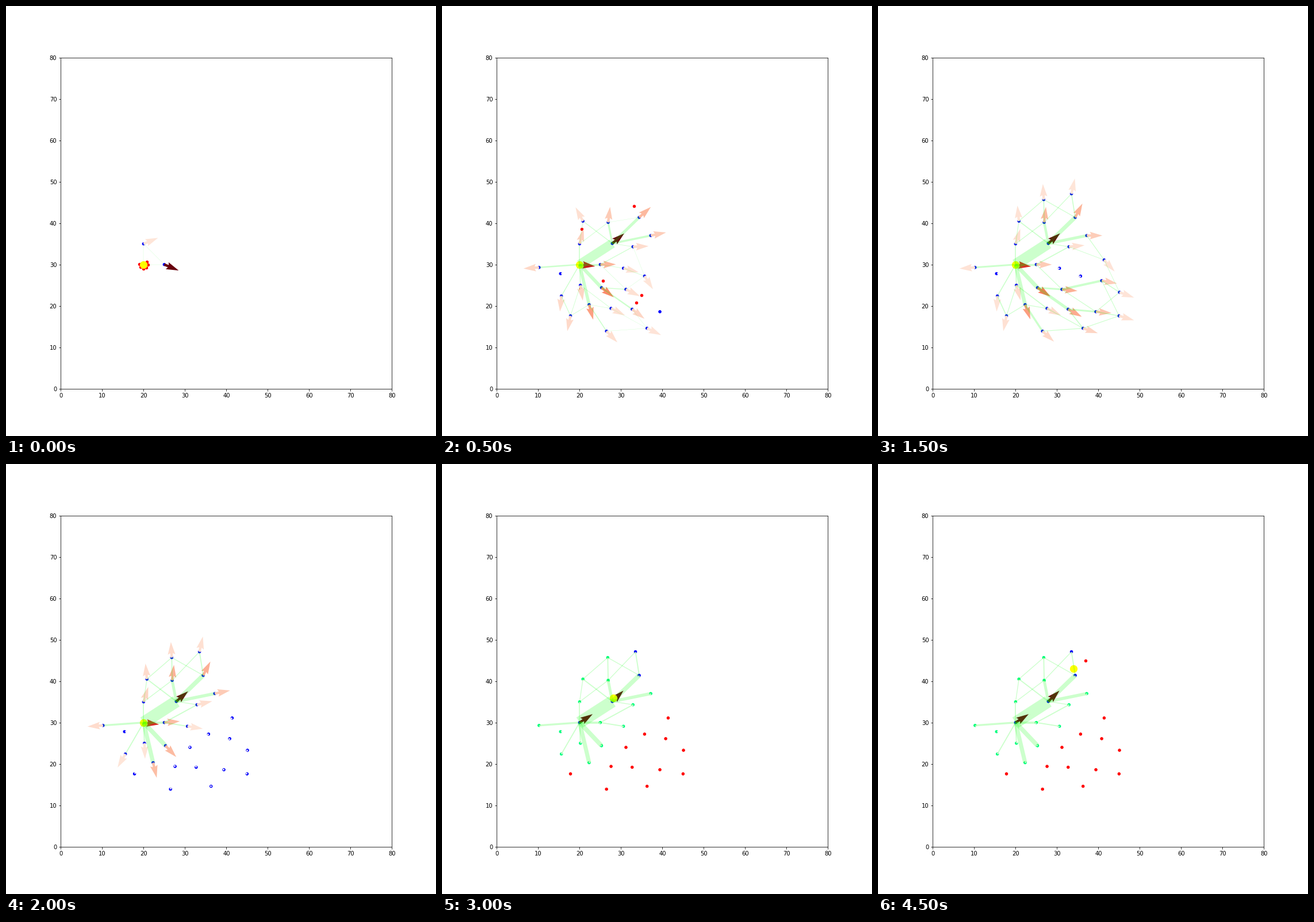
A matplotlib script that plays this animation: 748 by 748 pixels, repeating every 5000 ms.

```python
import numpy as np
import matplotlib.pyplot as plt
from matplotlib.animation import FuncAnimation
from matplotlib.collections import LineCollection

STEPS = 50
WITHER, PRUNE, MARK, FORAGE = 13, 20, 25, 38  # steps where the colony changes

# x, y, parent; listed in order of birth
CELLS = [
    (20, 30, None), (20, 35, 0), (25, 30, 0), (20.2, 25, 0), (25.3, 24.4, 0),
    (27.9, 35.1, 0), (15.6, 22.4, 0), (15.4, 27.8, None), (10.2, 29.3, 0),
    (22.3, 20.3, 0), (17.8, 17.6, 6), (20.8, 40.5, 5), (26.9, 40.2, 5),
    (34.4, 41.4, 5), (37.2, 37, 5), (32.9, 34.3, 2), (30.6, 29.1, 2),
    (35.7, 27.2, 16), (31.2, 24, 4), (27.6, 19.4, 3), (32.7, 19.2, 4),
    (26.5, 13.9, 9), (36.3, 14.6, 20), (39.4, 18.6, 20), (26.8, 45.7, 12),
    (33.5, 47.1, 13), (40.8, 26.1, 18), (45, 17.6, 23), (45.1, 23.3, 26),
    (41.4, 31.1, 14)]
POS = np.array([c[:2] for c in CELLS])
BIRTH = np.floor(np.interp(range(len(CELLS)), [2, 3, 22, 23, 24, 26, 27, 29],
                           [-1, 1, 4, 5, 7, 7, 9, 12]))
REACH = np.hypot(*(POS - POS[0]).T)
DEAD = (REACH > 12) & (POS[:, 1] < 32)  # far from the trail to the food
TRAIL = [0, 5, 13, 25]
WITHERED = (16, 17)

# widths of the main veins; other branches stay thin
VEINS = {5: 19, 13: 7, 4: 7, 9: 6.5, 20: 5, 14: 5, 12: 4.5, 26: 4, 2: 3.5,
         21: 3.5, 18: 3, 23: 3, 8: 3}
TREE = [(c[2], n, VEINS.get(n, 1.7))
        for n, c in enumerate(CELLS) if c[2] is not None]
CROSS = [(i, j, 1.2) for i, j in [
    (1, 11), (1, 12), (9, 10), (3, 10), (9, 19), (21, 22), (19, 22), (2, 18),
    (22, 27), (23, 28), (26, 27), (15, 29), (29, 28), (11, 24), (13, 24),
    (12, 25), (5, 15), (18, 23)]]
BRIEF = [(1, 2), (15, 17), (17, 18), (17, 26), (12, 13), (24, 25)]

# where each scout has got to at steps 5, 8 and 13
SCOUTS = [
    [(33.1, 44.2)], [(35, 22.6), (39, 27.9), (44.5, 23)],
    [(33.7, 20.8), (43, 20), (45, 18)], [(20.2, 24.3)], [(20.5, 38.6)],
    [(25.7, 26.1), (29, 22.8), (33, 24)]]
FOOD = [(25, 20, 30), (30, 28.1, 36), (36, 34.2, 42.5), (37, 34.2, 42.5),
        (38, 34, 43)]


def polar(deg):
    return np.array([np.cos(np.radians(deg)), np.sin(np.radians(deg))])


def along(times, points, step):
    x, y = np.transpose(points)
    return np.array([np.interp(step, times, x), np.interp(step, times, y)])


def food(step):
    t, *xy = np.transpose(FOOD)
    return along(t, np.transpose(xy), step)


def scouts(step):
    if step >= FORAGE:
        r = 3.5 * min(1, (step - FORAGE + 1) / 8)
        count = 3 if step < FORAGE + 6 else 1
        return [food(step) + r * polar(35 + 120 * k) for k in range(count)]
    found = []
    for k, stops in enumerate(SCOUTS):
        times = [0, 5, 8, 13][:len(stops) + 1]
        if step <= times[-1]:
            start = POS[0] + polar(40 - 45 * k)
            found.append(along(times, [start, *stops], step))
    return found


def tubes(step):
    """Tubes open at this step as (from, to, width)."""
    pruned = step >= PRUNE
    found = []
    for i, j, full in TREE + CROSS:
        age = step - max(BIRTH[i], BIRTH[j])
        withered = j in WITHERED and WITHER <= step < PRUNE
        if age <= 0 or withered or pruned and (DEAD[i] or DEAD[j]):
            continue
        grown = full * (1 - np.exp((1 - age) / 1.6))
        found.append((i, j, max(.4, grown * (1.1 if pruned else 1))))
    for i, j in BRIEF:
        if 0 < step - max(BIRTH[i], BIRTH[j]) < 6 and not pruned:
            found.append((i, j, .4))
    return found


def arrows(step, net):
    """Map each cell to its flow direction and heat."""
    if step > PRUNE:
        return {a: (POS[b] - POS[a], 1) for a, b in zip(TRAIL[:2], TRAIL[1:])}
    flow = np.zeros_like(POS)
    for i, j, width in net:
        pull = POS[j] - POS[i]
        pull = pull * width / np.hypot(*pull)
        flow[i] += pull
        flow[j] += pull
    size = np.hypot(*flow.T)
    live = [n for n in np.flatnonzero(size) if n or step]
    low, high = size[live].min(), size[live].max()
    return {n: (flow[n], .1 + .9 * (size[n] - low) / (high - low))
            for n in live}


def cell_color(n, step):
    if step < MARK or n in TRAIL:
        return "blue"
    return "red" if DEAD[n] else "springgreen"


fig, ax = plt.subplots(figsize=(748 / 72, 748 / 72), dpi=72)
ax.set(xlim=(0, 80), ylim=(0, 80), aspect="equal")
drawn = []


def dots(points, color, size, z):
    if len(points):
        x, y = np.transpose(points)
        drawn.append(ax.scatter(x, y, s=size, c=color, zorder=z))


def update(step):
    while drawn:
        drawn.pop().remove()
    cells = [n for n in range(len(CELLS)) if BIRTH[n] <= step]
    dots(POS[cells], [cell_color(n, step) for n in cells], 20, 1)
    dots(scouts(step), "red", 20, 1.1)

    net = tubes(step)
    flow = arrows(step, net)
    # cells without flow show a pale notch on the side of the root
    idle = [n for n in cells if n and n not in flow and BIRTH[n] < step
            and not (step >= MARK and DEAD[n])]
    notch = [POS[n] + .22 * (POS[0] - POS[n]) / REACH[n] for n in idle]
    dots(notch, "#fff5f0", 3, 1.2)

    ids = list(flow)
    u, v = np.transpose([flow[n][0] for n in ids])
    length = np.hypot(u, v)
    drawn.append(ax.quiver(*POS[ids].T, u / length, v / length,
                           [flow[n][1] for n in ids], cmap="Reds",
                           clim=(0, 1), units="width", width=.0075,
                           scale=21.3, scale_units="width", zorder=1.3))
    dots([food(step)], "yellow", 150, 1.4)

    drawn.append(ax.add_collection(
        LineCollection([POS[[i, j]] for i, j, _ in net],
                       linewidths=[w for *_, w in net],
                       colors=[(0, 1, 0, .2)], zorder=2), autolim=False))
    return drawn


anim = FuncAnimation(fig, update, frames=STEPS, interval=100, repeat=True,
                     repeat_delay=0, blit=False)
plt.show()
```
